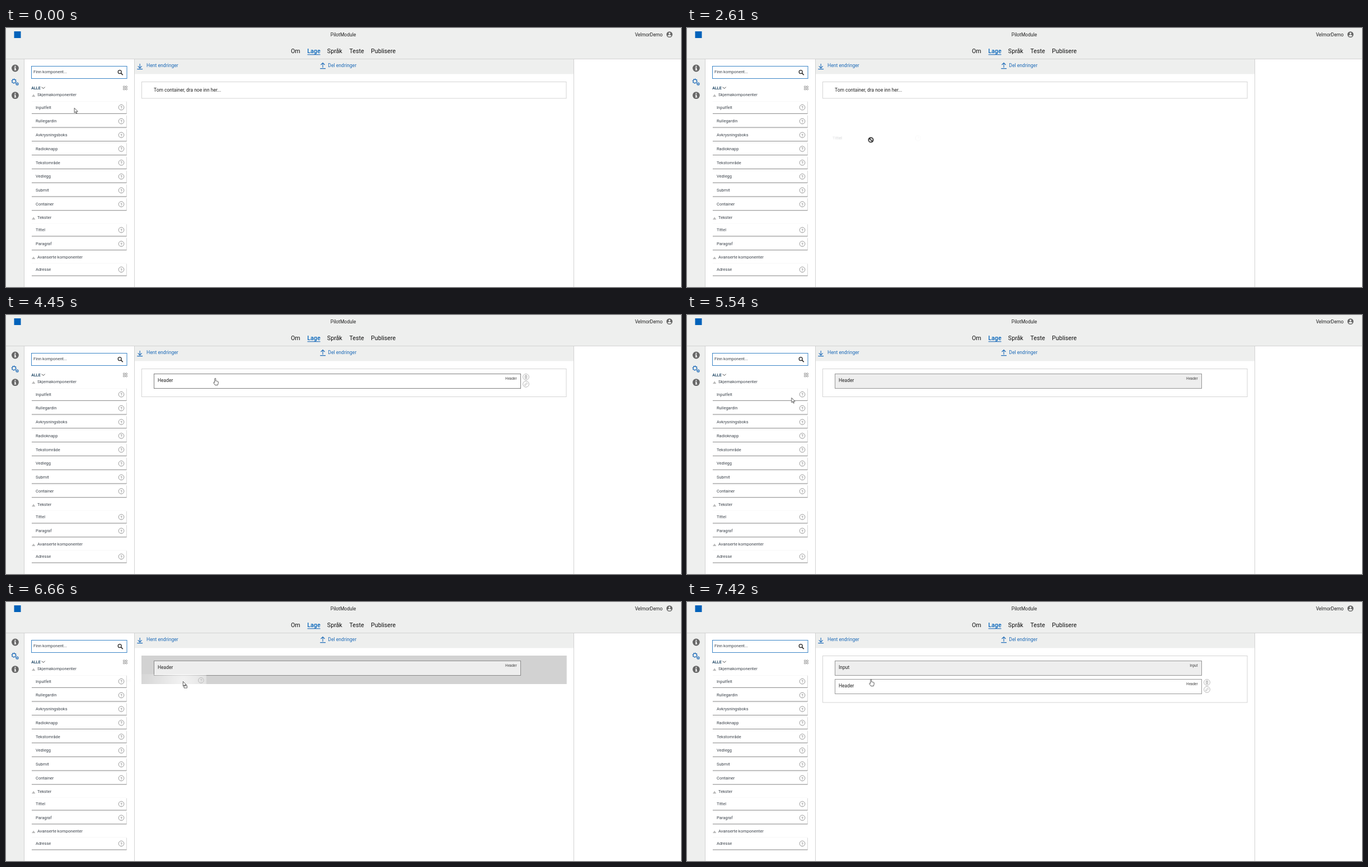
These frames come from a looping animation (1206 px wide and 464 px high, 8 s). An HTML page:

```html
<!DOCTYPE html>
<html lang="nb">
<head>
<meta charset="utf-8">
<title>Form builder</title>
<style>
html, body { margin: 0; width: 100%; height: 100%; overflow: hidden; background: #fff; }
svg { display: block; width: 1206px; height: 464px; }
text { font: 7.5px Roboto, Arial, sans-serif; fill: #3c434b; }
.nav text { font-size: 10.7px; fill: #111; }
.nav .on { font-weight: 500; fill: #0062ba; }
.big { font-size: 8.5px; fill: #222; }
.link { font-size: 8.65px; fill: #1e6bb8; }
.tag { font-size: 6.4px; fill: #444; text-anchor: end; }
.all { font-size: 7.1px; font-weight: 500; fill: #022f51; }
.head { font-size: 7.6px; }
.q { font-size: 7.6px; fill: #777; text-anchor: middle; }
.line { fill: none; stroke: #777; stroke-width: .75; }
.blue { fill: none; stroke: #1e6bb8; stroke-width: 1.1; }
.search { fill: #fff; stroke: #3a84c6; }
.frame { fill: #fff; stroke: #d4d4d4; }
.card { fill: #fff; filter: drop-shadow(0 1px .4px rgba(0, 0, 0, .42)) drop-shadow(0 .2px .6px rgba(0, 0, 0, .22)); }
.ghost .card { filter: none; }
.field { stroke: #333; stroke-dasharray: 1 1; }
.cur { fill: #fff; stroke: #333; stroke-width: .8; stroke-linejoin: round; }

.anim { animation: 8s step-end infinite; }
#pointer { animation-name: move; }
#empty { animation-name: empty; }
#single { animation-name: single; }
#over { animation-name: over; }
#hover { animation-name: hover; }
#double { animation-name: double; }
#arrow { animation-name: arrow; }
#ban { animation-name: ban; }
#drop { animation-name: drop; }
#hand { animation-name: hand; }
#ghostA { animation-name: ghostA; }
#ghostB { animation-name: ghostB; }

@keyframes move {
  0% { transform: translate(121.8px, 143px); }
  9% { transform: translate(122.5px, 150px); }
  11% { transform: translate(124px, 206px); }
  12.875% { transform: translate(125px, 284px); }
  14.875% { transform: translate(123.5px, 338px); }
  16.75% { transform: translate(122px, 358px); }
  20.625% { transform: translate(122px, 360px); }
  22.75% { transform: translate(122px, 362px); }
  24.875% { transform: translate(122px, 363.5px); }
  28.625% { transform: translate(124px, 362.5px); }
  30.625% { transform: translate(214px, 302px); }
  32.625% { transform: translate(328.5px, 199.5px); }
  34.75% { transform: translate(355px, 147px); }
  36.5% { transform: translate(371px, 119px); }
  38.375% { transform: translate(374px, 112px); }
  48% { transform: translate(374px, 113px); }
  65.375% { transform: translate(332px, 127px); }
  67.375% { transform: translate(245px, 146px); }
  69.25% { transform: translate(186.5px, 148px); }
  71.25% { transform: translate(152px, 146px); }
  73.375% { transform: translate(137px, 145px); }
  75.5% { transform: translate(156px, 144px); }
  77.625% { transform: translate(173.5px, 143.5px); }
  79.5% { transform: translate(208px, 146px); }
  81.25% { transform: translate(296.5px, 146.5px); }
  83.25% { transform: translate(316px, 142px); }
  85.125% { transform: translate(326px, 139px); }
  87.125%, 100% { transform: translate(329px, 138px); }
}
@keyframes empty { 0% { opacity: 1 } 53.75%, 100% { opacity: 0 } }
@keyframes single { 0% { opacity: 0 } 53.75% { opacity: 1 } 92.75%, 100% { opacity: 0 } }
@keyframes hover { 0% { opacity: 0 } 55.625% { opacity: 1 } 67.375%, 100% { opacity: 0 } }
@keyframes over { 0% { opacity: 0 } 83.25% { opacity: 1 } 92.75%, 100% { opacity: 0 } }
@keyframes double { 0% { opacity: 0 } 92.75%, 100% { opacity: 1 } }
@keyframes arrow {
  0% { opacity: 1 } 28.625% { opacity: 0 } 50.125% { opacity: 1 }
  55.625% { opacity: 0 } 67.375% { opacity: 1 } 79.5%, 100% { opacity: 0 }
}
@keyframes ban {
  0% { opacity: 0 } 28.625% { opacity: 1 } 36.5% { opacity: 0 }
  79.5% { opacity: 1 } 83.25%, 100% { opacity: 0 }
}
@keyframes drop {
  0% { opacity: 0 } 36.5% { opacity: 1 } 50.125% { opacity: 0 }
  83.25% { opacity: 1 } 92.75%, 100% { opacity: 0 }
}
@keyframes hand {
  0% { opacity: 0 } 55.625% { opacity: 1 } 67.375% { opacity: 0 } 92.75%, 100% { opacity: 1 }
}
@keyframes ghostA { 0% { opacity: 0 } 28.625% { opacity: 1 } 50.125%, 100% { opacity: 0 } }
@keyframes ghostB { 0% { opacity: 0 } 79.5% { opacity: 1 } 92.75%, 100% { opacity: 0 } }
</style>
</head>
<body>
<svg id="stage" viewBox="0 0 1206 464"></svg>
<script>
const text = (x, y, s, cls = '') => `<text x="${x}" y="${y}" class="${cls}">${s}</text>`;
const rect = (x, y, w, h, attrs) => `<rect x="${x}" y="${y}" width="${w}" height="${h}" ${attrs}/>`;
const path = (d, cls) => `<path d="${d}" class="${cls}"/>`;
const at = (x, y, s) => `<g transform="translate(${x} ${y})">${s}</g>`;
const anim = (id, s) => `<g id="${id}" class="anim">${s}</g>`;

// A component card, centred on y
const row = (y, label) =>
  rect(46, y - 10.8, 169.5, 21.6, 'class="card"') + text(53, y + 2.5, label) +
  `<circle cx="206" cy="${y + .2}" r="4.8" class="line"/>` + text(206, y + 3, '?', 'q');

const section = (y, label) =>
  `<path d="M46 ${y + 3}l3.2-4.6 3.2 4.6z" fill="#bbb"/>` + text(56, y + 2.1, label, 'head');

const info = y => at(16.4, y, `<circle r="6.4" fill="#666"/>
  <path d="M-1-4.2h2v1.9h-2zM-1.7-1.2H1V2.6h.9v1.2h-3.6V2.6h.8V0h-.8z" fill="#fff"/>`);

const gear = (x, y, r) => at(x, y, `<circle r="${r}" class="blue"/>
  <circle r="${r + 1}" class="blue" pathLength="16" stroke-dasharray="1 1"/>`);

const field = (y, label, fill) =>
  rect(264.5, y + .5, 655, 26, `class="field" fill="${fill}"`) +
  text(271, y + 15.1, label, 'big') + text(912.7, y + 10.8, label, 'tag');

const tools = y => `<g style="stroke:#999;fill:none;stroke-width:.7">
  <circle cx="929" cy="${y + 6}" r="5.4"/><circle cx="929" cy="${y + 18.8}" r="5.4"/>
  <path d="M926.8 ${y + 4.2}h4.4M928.2 ${y + 4}v-1h1.6v1M927.3 ${y + 4.5}l.3 4.5h2.8l.3-4.5M929 ${y + 5.2}v3"/>
  <path d="M926.7 ${y + 21.2}l.5-1.9 3.1-3.1 1.4 1.4-3.1 3.1z"/></g>`;

const rows = [['Inputfelt', 142], ['Rullegardin', 166.8], ['Avkrysningsboks', 191.5],
  ['Radioknapp', 216.3], ['Tekstområde', 241.1], ['Vedlegg', 265.9], ['Submit', 290.7],
  ['Container', 315.5], ['Tittel', 361.7], ['Paragraf', 386.5], ['Adresse', 432.6]];
const tabs = [['Om', 509], ['Lage', 538.3], ['Språk', 573.8], ['Teste', 613.5], ['Publisere', 652]];

const header =
  rect(0, 0, 1206, 55, 'fill="#eeefee"') + rect(0, 55, 32.5, 409, 'fill="#eeefee"') +
  rect(230, 55, 784, 27.5, 'fill="#eeefee"') +
  '<path d="M0 55.5H1206M32.5 55V464M229.5 55V464M1014.5 55V464" stroke="#d2d2d2"/>' +
  rect(14.5, 6, 12, 12, 'fill="#0062ba"') +
  '<g text-anchor="middle">' + text(602.5, 14.6, 'PilotModule', 'big') + '</g>' +
  '<g text-anchor="end">' + text(1173, 14.6, 'VelmorDemo', 'big') + '</g>' +
  at(1185.4, 11.6, `<circle r="5.4" fill="#666"/><circle cy="-1.8" r="1.7" fill="#eeefee"/>
    <path d="M-3.3 2.3C-2.8.2 2.8.2 3.3 2.3C2 4.4-2 4.4-3.3 2.3z" fill="#eeefee"/>`) +
  '<g class="nav">' + tabs.map(([s, x]) => text(x, 44.6, s, s === 'Lage' ? 'on' : '')).join('') + '</g>' +
  path('M538.5 47.7H561.5', 'blue') +
  path('M239.2 64V72M235.7 68.4l3.5 3.5 3.5-3.5M234.3 73.6h9.8', 'blue') +
  text(251, 70, 'Hent endringer', 'link') +
  path('M566 71V62.6M562.5 66l3.5-3.5 3.5 3.5M561.2 72.6h9.8', 'blue') +
  text(575.3, 70, 'Del endringer', 'link');

const sidebar =
  info(72) + gear(14.2, 95.2, 3.1) + gear(20, 100.2, 1.5) + info(120.6) +
  rect(45.5, 68.5, 170.5, 22, 'class="search"') + text(49, 81.3, 'Finn komponent...') +
  '<g fill="none" stroke="#222" stroke-width="1.2"><circle cx="203.2" cy="78.7" r="3"/>' +
  '<path d="M205.4 80.9l3.4 3.4" stroke-width="1.5"/></g>' +
  text(45.3, 109.7, 'ALLE', 'all') +
  '<path d="M63.8 105.7l2.9 2.9 2.9-2.9" fill="none" stroke="#333" stroke-width=".9"/>' +
  [209.5, 213.6].map(x => [104, 108].map(y => rect(x, y, 2.8, 2.8, 'rx=".7" class="line"')).join('')).join('') +
  section(120.2, 'Skjemakomponenter') + section(340.2, 'Tekster') + section(411, 'Avanserte komponenter') +
  rows.map(([s, y]) => row(y, s)).join('');

const frame = h => rect(242.5, 96.5, 758.5, h, 'class="frame"');
const canvas =
  anim('empty', frame(29.5) + text(264, 113.9, 'Tom container, dra noe inn her...', 'big')) +
  anim('single', frame(50) + anim('over', rect(242, 96, 759.5, 51, 'fill="#d2d2d2"')) +
    field(105, 'Header', '#eee') + anim('hover', field(105, 'Header', '#fff') + tools(105))) +
  anim('double', frame(83.5) + field(105, 'Input', '#eee') + field(138, 'Header', '#fff') + tools(138));

// The dragged card fades out with distance from the pointer
const ghost = (id, x, y, card) =>
  anim(id, `<g class="ghost" mask="url(#fade)">${at(-x, -y, card)}</g>`);
const tip = path('M.3.3V8.8L2.3 7L3.7 10.1L5 9.5L3.7 6.5H6.4Z', 'cur');
const pointer = anim('pointer',
  ghost('ghostA', 121.8, 364.2, row(361.7, 'Tittel')) +
  ghost('ghostB', 173.6, 143.9, row(142, 'Inputfelt')) +
  anim('arrow', tip) +
  anim('ban', `<g fill="#fff" stroke="#000" stroke-width="1.5">
    <circle cy="1" r="4.1"/><path d="M-2.8-1.8L2.8 3.8"/></g>`) +
  anim('drop', tip + rect(2, 8, 5.6, 4, 'class="cur"')) +
  anim('hand', path(`M-1.2 8V1.4a1 1 0 0 1 2 0V5.2q1-.6 1.6.4q1-.5 1.5.4q1.2-.3 1.3.9
    V9.4L4.2 12.6H-.4L-3 8.8Q-3.4 7.5-2.3 7.2Z`, 'cur')));

document.getElementById('stage').innerHTML = `<defs>
  <radialGradient id="glow" gradientUnits="userSpaceOnUse" cx="0" cy="0" r="120">
    <stop offset="0" stop-color="#fff" stop-opacity=".72"/>
    <stop offset=".25" stop-color="#fff" stop-opacity=".48"/>
    <stop offset=".5" stop-color="#fff" stop-opacity=".2"/>
    <stop offset=".7" stop-color="#fff" stop-opacity=".05"/>
    <stop offset="1" stop-color="#fff" stop-opacity="0"/>
  </radialGradient>
  <mask id="fade" maskUnits="userSpaceOnUse" x="-140" y="-40" width="280" height="80" style="mask-type:alpha">
    ${rect(-140, -40, 280, 80, 'fill="url(#glow)"')}
  </mask></defs>` + header + sidebar + canvas + pointer;
</script>
</body>
</html>
```
